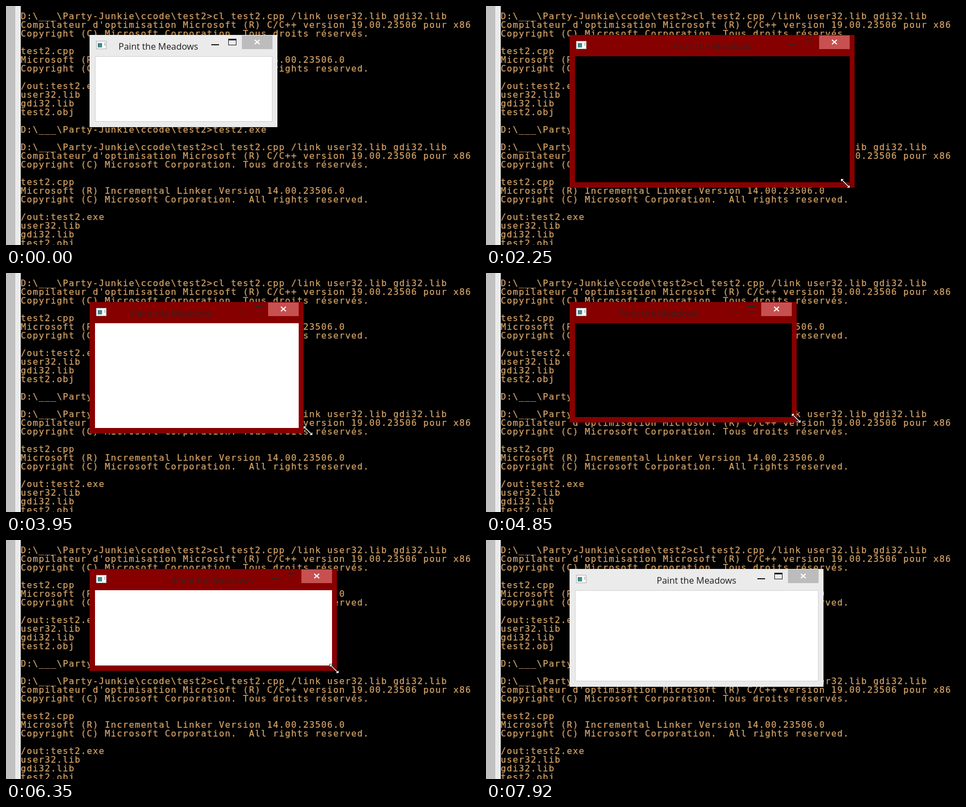
Recreate the animation shown at these times as an HTML page. Size 868 by 438 pixels, loop 8020 ms.

```html
<!DOCTYPE html>
<html lang="en">
<head>
<meta charset="utf-8">
<title>Resizing a window</title>
<style>
  html, body { margin: 0; width: 100%; height: 100%; overflow: hidden; background: #000; }
  #stage { position: relative; width: 868px; height: 438px; overflow: hidden; background: #000; }
  #stage div, #stage svg { position: absolute; }
  svg { overflow: visible; }
  .track { left: 0; top: 0; width: 17px; height: 438px; background: #c1c1c1; }
  .edge { left: 17px; top: 0; width: 10px; height: 438px; background: #ebebeb; }
  pre {
    position: absolute; left: 27px; top: 11px; margin: 0; color: #d6a468;
    font: 16px/16px "DejaVu Sans Mono", monospace; letter-spacing: 1.37px;
    -webkit-text-stroke: .25px;
  }
  #win { left: 153px; top: 53px; background: #ebebeb; --ink: #1c1c1c; --dim: var(--ink); --close: #bcbcbc; --line: #d2d2d2; }
  #win.active { background: #870000; box-shadow: inset 0 0 0 1px #790000; --ink: #35201c; --dim: #641010; --close: #c75050; --line: transparent; }
  #client { left: 10px; top: 39px; right: 9px; bottom: 10px; box-sizing: border-box; border: 1px solid var(--line); background: #fff; }
  #name {
    top: 11px; transform: translateX(-50%); white-space: nowrap; color: var(--ink);
    font: 16.4px/20px "Open Sans", "Noto Sans", sans-serif;
  }
  .icon { left: 12px; top: 11px; width: 17px; height: 13px; background: #fff; border: 1px solid #a9b0b0; }
  .icon::before { content: ""; position: absolute; left: 2px; top: 3px; width: 8px; height: 8px; background: linear-gradient(135deg, #3c7f9c, #4c9c78); }
  .icon::after { content: ""; position: absolute; right: 1px; top: 2px; width: 2px; height: 6px; background: #b4c4d0; }
  .min { right: 107px; top: 17px; width: 14px; height: 2px; background: var(--ink); }
  .max { right: 75px; top: 7px; width: 13px; height: 8px; border: 1px solid var(--dim); border-top: 3px solid var(--ink); }
  .close { right: 9px; top: 1px; width: 56px; height: 25px; background: var(--close); }
  .close svg { left: 28px; top: 12px; width: 1px; height: 1px; fill: none; stroke: #fff; stroke-width: 2; }
  #cursor { width: 1px; height: 1px; }
  #cursor path { fill: #fff; stroke: #000; stroke-width: 1.5; paint-order: stroke; }
</style>
</head>
<body>
<div id="stage">
  <div class="track"></div>
  <div class="edge"></div>
  <pre id="console"></pre>
  <div id="win">
    <div class="icon"></div>
    <div id="name">Paint the Meadows</div>
    <div class="min"></div>
    <div class="max"></div>
    <div class="close"><svg><path d="M-4.5-4 4.5 4M4.5-4-4.5 4"/></svg></div>
    <div id="client"></div>
  </div>
  <svg id="cursor"><path/></svg>
</div>
<script>
const $ = id => document.getElementById(id);
const win = $('win'), client = $('client'), name = $('name'), cursor = $('cursor');
const shape = cursor.querySelector('path');

const prompt = 'D:\\___\\Party-Junkie\\ccode\\test2>';
const build = `${prompt}cl test2.cpp /link user32.lib gdi32.lib
Compilateur d'optimisation Microsoft (R) C/C++ version 19.00.23506 pour x86
Copyright (C) Microsoft Corporation. Tous droits réservés.

test2.cpp
Microsoft (R) Incremental Linker Version 14.00.23506.0
Copyright (C) Microsoft Corporation.  All rights reserved.

/out:test2.exe
user32.lib
gdi32.lib
test2.obj
`;
$('console').textContent = `${build}\n${prompt}test2.exe\n\n${build}`;

const LOOP = 8020, GRAB = 920, RELEASE = 7350, LEAVE = 7450, BLUR = 7850, END = 7920;
const LEFT = 153, TOP = 53;
const ARROW = 'M0 0V16l4-4 3 7 2-1-3-6h5z';
const RESIZE = 'M-8-8h5l-2 2 11 11 2-2v5h-5l2-2-11-11-2 2z';

// Turning points of the pointer: time, x, y
const turns = [
  [0, 588, 375], [GRAB, 492, 218], [1300, 610, 308], [1750, 719, 343],
  [3150, 548, 293], [3850, 540, 290], [4550, 630, 282], [4750, 564, 270],
  [5650, 604, 237], [6850, 598, 235], [6950, 590, 240], [RELEASE, 613, 265],
  [BLUR, 759, 347], [LOOP, 759, 347]
];

function pointer(t) {
  const i = Math.max(1, turns.findIndex(p => p[0] >= t));
  const [t0, x0, y0] = turns[i - 1], [t1, x1, y1] = turns[i];
  const k = (t - t0) / (t1 - t0);
  return [x0 + (x1 - x0) * k, y0 + (y1 - y0) * k].map(Math.round);
}

// The picture is renewed every 100 ms, with two shorter gaps.
function tick(t) {
  if (t < 20) return 0;
  if (t >= END) return END;
  const start = t < 1250 ? 20 : 1250;
  return start + Math.floor((t - start) / 100) * 100;
}

function draw(t) {
  // The window trails the pointer by one step.
  const [cx, cy] = pointer(Math.min(RELEASE, Math.max(GRAB, t - 100)));
  const right = cx + 5, bottom = cy + 4;
  win.style.width = right - LEFT + 'px';
  win.style.height = bottom - TOP + 'px';
  win.className = t > GRAB && t < BLUR ? 'active' : '';

  // The caption sits mid-window, or between icon and buttons when space is short.
  const mid = right >= 585 ? (LEFT + right) / 2 : (right + 61) / 2;
  name.style.left = mid - LEFT + 'px';

  // Repaints flash black in an irregular rhythm.
  const n = (t - 1250) / 100;
  const black = n >= 0 && t <= RELEASE && n * 0.618 % 1 < 0.32;
  client.style.background = black ? '#000' : '#fff';

  const [x, y] = pointer(t);
  cursor.style.left = x + 'px';
  cursor.style.top = y + 'px';
  cursor.style.display = t < 20 || t >= END ? 'none' : '';
  shape.setAttribute('d', t < GRAB || t > LEAVE ? ARROW : RESIZE);
}

const begin = performance.now();
function frame() {
  draw(tick((performance.now() - begin) % LOOP));
  requestAnimationFrame(frame);
}
frame();
</script>
</body>
</html>
```
